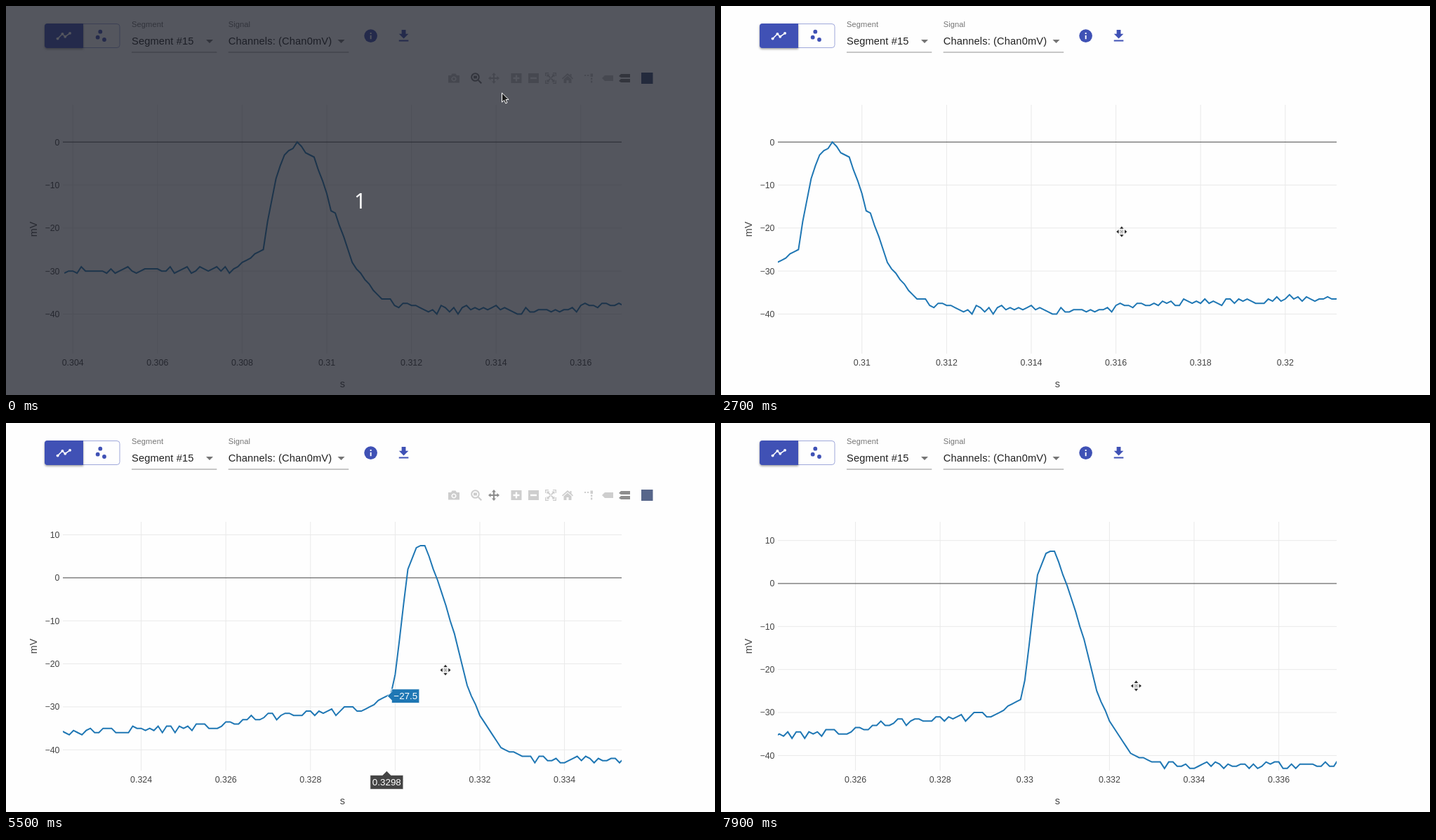
Animation, 1010 px wide and 555 px high, one loop 8 s. Source, as an HTML page:

```html
<!DOCTYPE html>
<html lang="en">
<head>
<meta charset="utf-8">
<title>Segment viewer</title>
<style>
  html, body { margin: 0; width: 100%; height: 100%; overflow: hidden; background: #fefefe; }
  svg { display: block; width: 100%; height: 100%; font-family: "Liberation Sans", Arial, sans-serif; }
  .tick { font-size: 12.4px; fill: #444; }
  .title { font-size: 14.4px; fill: #444; text-anchor: middle; }
  .label { font-size: 11.1px; letter-spacing: .1px; fill: #757575; }
  .value { font-size: 14.65px; letter-spacing: .14px; fill: #212121; }
  .tip { font-size: 13.4px; fill: #fff; }
  .pan { font-size: 12.8px; fill: #fff; text-anchor: middle; }
  .count { font: 30px "Noto Sans", "Open Sans", sans-serif; fill: #fff; text-anchor: middle; }
  .icon { fill: #444; stroke: #444; stroke-width: 0; opacity: .3; fill-rule: evenodd; }
  .icon.on { opacity: .7; }
</style>
</head>
<body>
<svg viewBox="0 0 1010 555" xmlns="http://www.w3.org/2000/svg">
  <defs>
    <clipPath id="area"><rect x="81" y="141" width="796" height="355"/></clipPath>
    <filter id="shade" x="-20%" y="-20%" width="140%" height="150%">
      <feDropShadow dx="0" dy="1.5" stdDeviation="1.6" flood-opacity=".4"/>
    </filter>
  </defs>
  <rect width="1010" height="555" fill="#fefefe"/>

  <!-- header -->
  <rect x="55.5" y="25.5" width="106.5" height="34" rx="4" fill="#fefefe" stroke="#9fa8da"/>
  <path d="M110 25H59a4 4 0 0 0-4 4V56a4 4 0 0 0 4 4H110z" fill="#3f51b5" filter="url(#shade)"/>
  <g fill="#fff" transform="translate(70.7 31.1) scale(.97)">
    <path d="M3 16L10 9 14 13 21 8" fill="none" stroke="#fff" stroke-width="1.5"/>
    <circle cx="3" cy="16" r="2"/><circle cx="10" cy="9" r="2"/>
    <circle cx="14" cy="13" r="2"/><circle cx="21" cy="8" r="2"/>
  </g>
  <g fill="#3f51b5">
    <circle cx="134.3" cy="36.7" r="2.9"/><circle cx="130.7" cy="44.7" r="2.9"/><circle cx="140" cy="48" r="2.9"/>
    <circle cx="519.6" cy="42.6" r="9.3"/>
    <path transform="translate(554.9 31) scale(.97)" d="M19 9h-4V3H9v6H5l7 7 7-7zM5 18v2h14v-2H5z"/>
  </g>
  <path d="M518.7 38h1.9v1.9h-1.9zM518.7 41.7h1.9v5.6h-1.9z" fill="#fff"/>
  <text class="label" x="179" y="30.3">Segment</text>
  <text class="value" x="179" y="54.6">Segment #15</text>
  <text class="label" x="316.7" y="30.3">Signal</text>
  <text class="value" x="316.7" y="54.6">Channels: (Chan0mV)</text>
  <path d="M179 66h121.3M316.7 66h171.5" stroke="#8f8f8f"/>
  <path d="M285 48h10l-5 5zM472.5 48h10l-5 5z" fill="#757575"/>

  <!-- plot -->
  <g id="grid"></g>
  <path id="trace" clip-path="url(#area)" fill="none" stroke="#1f77b4" stroke-width="2"/>
  <text class="title" x="479.3" y="544">s</text>
  <text class="title" transform="translate(44 318.5) rotate(-90)">mV</text>
  <g id="hover"></g>

  <g id="bar"></g>
  <g id="tooltip">
    <path d="M695 112.5l5.5 6h-11z" fill="#69738a"/>
    <rect x="671.5" y="118" width="41.5" height="28.5" rx="2" fill="#69738a"/>
    <text class="pan" x="692.2" y="136.7">Pan</text>
  </g>

  <g id="dim">
    <rect width="1010" height="555" fill="#1b1e29" fill-opacity=".75"/>
    <text class="count" x="504.5" y="288.5">1</text>
  </g>

  <!-- pointers -->
  <path id="arrow" d="M0 0V13.2L3.2 10.4 5.3 15 7.5 14 5.5 9.5H9.6z" fill="#1c1c1c" stroke="#fff"/>
  <path id="hand" d="M-.5 .5Q1-1 2.2 .5V4.5L9 6.2V10L7.8 13.5H1.5L-1.8 9.5-1.5 7.5-.5 8z" fill="#1f2023" stroke="#fff" stroke-width=".8"/>
  <g id="move">
    <path d="M0-8L8 0 0 8-8 0z" fill="#fff" stroke="#ddd" stroke-width=".6"/>
    <path d="M0-7.5l2.7 3.3h-5.4zM0 7.5l2.7-3.3h-5.4zM-7.5 0l3.3-2.7v5.4zM7.5 0l-3.3-2.7v5.4z" fill="#222"/>
    <rect x="-2.2" y="-2.2" width="4.4" height="4.4" fill="#eee" stroke="#888" stroke-dasharray="1.2 .8"/>
    <circle r=".8" fill="#333"/>
  </g>
</svg>

<script>
const $ = id => document.getElementById(id);
const LOOP = 8000, STEP = 100;
const LEFT = 81, RIGHT = 877, TOP = 141, BOTTOM = 496;
const SAMPLE = 6.03, MV = 6.135, START = 83.14, ZERO = 194.1;

// bends of the signal: sample (0.1 ms each, from 0.3038 s), mV
const bends = [
  [-1, -29.9], [40, -29.5], [43, -27.5],
  [47, -25], [48, -18.5], [50, -8.5], [52, -3], [54, -1.5], [55, 0], [57, -2.5],
  [59, -3.5], [62, -12], [63, -16], [64, -16.5], [68, -28], [75, -37],
  [84, -39], [120, -39], [128, -37.8], [162, -36.6], [200, -35.4], [220, -34.6], [230, -32.5], [255, -30.4],
  [261, -27], [262, -22.5], [265, 2], [267, 7], [269, 7.5], [271, 2],
  [273, -3.5], [276, -13], [279, -25], [282, -32], [287, -39.5], [293, -42],
  [310, -42.6], [340, -41.6]
];

// pointer way: time, x, y, dragging the plot on the way there
const way = [
  [0, 706.5, 124], [400, 706.5, 124], [700, 699, 104.5], [1500, 699, 104.5],
  [1800, 195, 310], [2000, 869, 322], [2200, 827, 322],
  [2700, 570.8, 322, true], [3100, 97, 322, true], [3200, 97, 322],
  [4200, 755, 342], [4300, 755, 342],
  [4600, 570.8, 352.4, true], [5100, 376.4, 368.8, true], [5200, 376.4, 368.8],
  [5500, 626, 352.5], [6000, 713, 367], [6100, 713, 367],
  [7000, 621.9, 299.6, true], [7200, 621.9, 289.6, true], [7300, 621.9, 289.6],
  [7900, 591.4, 375.1, true]
];
// times at which the pointer is free of the plot
const idle = [[-1000, 2200], [3100, 4300], [5200, 6100]];

const clamp = v => Math.max(0, Math.min(1, v));

let seed = 11;
const rnd = () => (seed = seed * 16807 % 2147483647) / 2147483647;

// steep parts are clean, resting parts noisy, all in steps of 0.5 mV
const data = Array.from({ length: 340 }, (_, i) => {
  const k = bends.findIndex(b => b[0] > i);
  const [x0, v0] = bends[k - 1], [x1, v1] = bends[k];
  const slope = (v1 - v0) / (x1 - x0);
  const noise = Math.abs(slope) < .24 ? (rnd() - .5) * 1.7 : 0;
  return Math.round((v0 + slope * (i - x0) + noise) * 2) / 2;
});

// pointer place and the sum of all drags up to t
function pose(t) {
  let [, x, y] = way[0], panX = 0, panY = 0;
  for (let k = 1; k < way.length; k++) {
    const [t0, x0, y0] = way[k - 1], [t1, x1, y1, drag] = way[k];
    if (t <= t0) break;
    const f = clamp((t - t0) / (t1 - t0));
    const dx = (x1 - x0) * f, dy = (y1 - y0) * f;
    x = x0 + dx;
    y = y0 + dy;
    if (drag) { panX += dx; panY += dy; }
  }
  return { x, y, panX, panY };
}

// toolbar: name, centre x, shape
const square = 'M-7.5-7h15v14h-15z';
const turns = part => [0, 90, 180, 270].map(a => `<g transform="rotate(${a})">${part}</g>`).join('');
const icons = [
  ['camera', 638, '<path d="M-8-4h4l1.5-2.5h5L4-4h4V6.5H-8zM0-2.5a3.5 3.5 0 1 0 .01 0z"/><circle cy="1" r="2"/>'],
  ['zoom', 670, '<circle cx="-1.5" cy="-1.5" r="5.3" fill="none" stroke-width="2"/><path d="M2 3.5L3.5 2 8 6.5 6.5 8zM-4-3.5h5v4h-5z"/>'],
  ['pan', 695, turns('<path d="M0-8l3 3.5H1V0h-2v-4.500h-2z"/>')],
  ['plus', 727, `<path d="${square}M-1.2-4.5v3.3h-3.3v2.4h3.3v3.3h2.4V1.2h3.3v-2.4H1.2v-3.3z"/>`],
  ['minus', 751.5, `<path d="${square}M-4.5-1.2v2.4h9v-2.4z"/>`],
  ['auto', 776, turns('<path d="M-7.3-3v-4.3H-3" fill="none" stroke-width="1.3"/><path d="M-5.5-5.5h4l-1.200 1.200L0-1 -1 0-4.300-2.700-5.500-1.500z"/>')],
  ['home', 800, '<path d="M0-7l3.5 3v-2h2v3.800L8 .3 7 1.500 0-4.500-7 1.500-8 .3zM-5.500 1.500L0-3.200l5.500 4.700V7H1.500V3h-3v4h-4z"/>'],
  ['spike', 831, '<path d="M-7-5h2.200v2h-2.200zM-3-5h2.200v2H-3zM1.500-6.500H5v4.500H1.500zM2-.5h2.300v2.500H2zM2 3.500h2.300V6.500H2z"/>'],
  ['closest', 857, '<path d="M-8 0l4-4H8v8H-4z"/>'],
  ['compare', 881, '<path d="M-8-3l3-3H8v5H-5zM-8 4l3-3H8v5H-5z"/>']
];
$('bar').innerHTML = icons.map(([name, x, shape]) =>
  `<g id="${name}" class="icon" transform="translate(${x} 103)">${shape}</g>`).join('') +
  '<rect x="905" y="95" width="16.500" height="16" fill="#3c4e78"/>';
$('compare').classList.add('on');

const minus = v => String(v).replace('-', '−');
const rule = (x1, y1, x2, y2, color) =>
  `<line x1="${x1}" y1="${y1}" x2="${x2}" y2="${y2}" stroke="${color}"/>`;

function drawPlot(px, py) {
  let lines = '', labels = '';
  for (let ms = 304; ms <= 338; ms += 2) {
    const x = px((ms - 303.8) * 10);
    if (x < LEFT || x > RIGHT) continue;
    lines += rule(x, TOP, x, BOTTOM, '#e9e9e9');
    labels += `<text class="tick" x="${x}" y="513" text-anchor="middle">${ms / 1000}</text>`;
  }
  for (let v = -50; v <= 10; v += 10) {
    const y = py(v);
    if (y < TOP || y > BOTTOM) continue;
    lines += rule(LEFT, y, RIGHT, y, v ? '#e9e9e9' : '#444');
    labels += `<text class="tick" x="76.5" y="${y + 4.4}" text-anchor="end">${minus(v)}</text>`;
  }
  $('grid').innerHTML = lines + labels;
  $('trace').setAttribute('d', 'M' + data.map((v, i) => px(i).toFixed(2) + ' ' + py(v).toFixed(2)).join('L'));
}

// the label trails the pointer by one step
function drawHover(t, px, py) {
  const late = pose(t - STEP);
  if (late.y < TOP || !idle.some(([a, b]) => t > a && t <= b)) return $('hover').innerHTML = '';
  const i = Math.round((late.x - px(0)) / SAMPLE);
  const x = px(i), y = py(data[i]);
  const value = minus(data[i]), time = String(+(.3038 + i / 1e4).toFixed(4));
  const width = s => [...s].reduce((w, c) => w + (c === '.' ? 3.7 : 7.45), 0) + 6;
  const half = width(time) / 2, wide = width(value);
  $('hover').innerHTML =
    `<path d="M${x} 496.5l6 6H${x + half}v20H${x - half}v-20H${x - 6}z" fill="#444" stroke="#fefefe" stroke-width=".6"/>
     <text class="tip" x="${x}" y="516.5" text-anchor="middle">${time}</text>
     <path d="M${x + 1} ${y}l6-6v-4h${wide}v20h${-wide}v-4z" fill="#1f77b4" stroke="#fefefe" stroke-width=".8"/>
     <text class="tip" x="${x + 10}" y="${y + 4.8}">${value}</text>`;
}

function drawPointer(t, x, y) {
  const shape = t < 700 ? 'arrow' : t < 1600 ? 'hand' : 'move';
  for (const id of ['arrow', 'hand', 'move']) {
    $(id).style.display = id === shape ? '' : 'none';
    $(id).setAttribute('transform', `translate(${x} ${y})`);
  }
}

function draw(t) {
  const { x, y, panX, panY } = pose(t);
  const px = i => START + i * SAMPLE + panX;
  const py = v => ZERO + panY - v * MV;
  drawPlot(px, py);
  drawHover(t, px, py);
  drawPointer(t, x, y);
  $('bar').style.opacity = Math.max(...idle.map(([a, b]) => clamp((t - a) / 350) * clamp(1 - (t - b) / 320)));
  $('dim').style.opacity = clamp(1 - t / 300);
  $('zoom').classList.toggle('on', t < 1300);
  $('pan').classList.toggle('on', t >= 700);
  $('tooltip').style.display = t >= 800 && t < 1600 ? '' : 'none';
}

let shown = -1;
const start = performance.now();
function tick() {
  const t = Math.floor((performance.now() - start) % LOOP / STEP) * STEP;
  if (t !== shown) draw(shown = t);
  requestAnimationFrame(tick);
}
tick();
</script>
</body>
</html>
```
